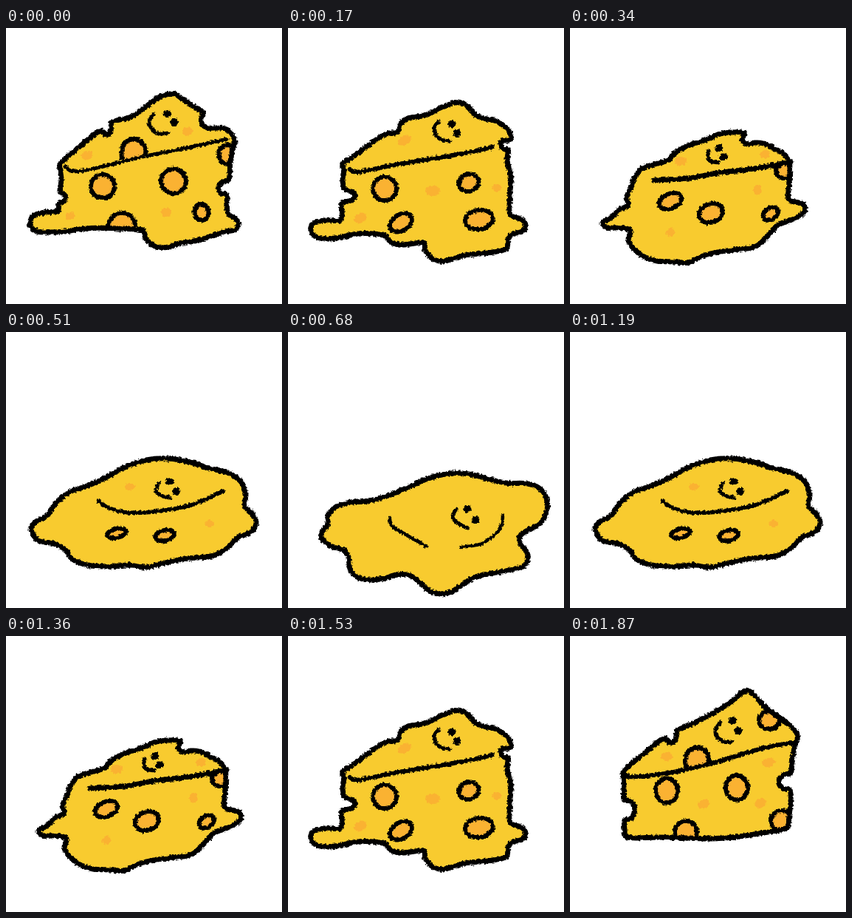
An HTML page that plays this animation: 374x373 px, repeating every 2040 ms.

```html
<!DOCTYPE html>
<html lang="en">
<head>
<meta charset="utf-8">
<title>Melting cheese</title>
<style>
  html, body { margin: 0; width: 100%; height: 100%; overflow: hidden; background: #fff; }
  svg { display: block; width: 100%; height: 100%; }
  .line { fill: none; stroke: #000; stroke-linecap: round; stroke-linejoin: round; }
  .hole { fill: #fab232; stroke: #000; stroke-width: 6; }
  .spot { fill: #fab232; }
</style>
</head>
<body>
<svg viewBox="0 0 374 373">
  <defs>
    <filter id="rough" filterUnits="userSpaceOnUse" x="0" y="0" width="374" height="373" color-interpolation-filters="sRGB">
      <feTurbulence type="fractalNoise" baseFrequency=".32" numOctaves="2" seed="4" result="n"/>
      <feDisplacementMap in="SourceGraphic" in2="n" scale="5" xChannelSelector="R" yChannelSelector="G"/>
    </filter>
    <clipPath id="inside"><path id="clip"/></clipPath>
  </defs>
  <g filter="url(#rough)">
    <path id="body" fill="#f8cb2f"/>
    <g id="marks" clip-path="url(#inside)"></g>
    <path id="rim" class="line" stroke-width="7"/>
    <g id="ink"></g>
  </g>
</svg>
<script>
const STEP = 170;

// rim, lines and smile are points on smooth curves.
// Holes and spots are [x, y, rx, ry, tilt]; eyes are [x, y].
const poses = [
  {
    rim: '72,184 78,177 101,158 125,139 131,141 137,145 143,140 145,128 151,125 177,113 203,99 222,86 232,77 239,74 247,77 256,87 267,98 285,111 299,122 307,131 308,138 304,152 301,170 299,185 290,187 284,193 283,199 288,206 298,208 299,225 297,243 295,258 285,262 262,266 230,271 190,274 160,273 120,272 90,273 76,271 74,262 74,249 82,247 87,239 87,229 81,223 73,221 73,205 72,190',
    lines: ['73,185 80,190 104,189 140,184 180,175 220,164 260,152 290,146 304,144'],
    lineWidth: 6,
    arch: '158,179 156,167 161,156 172,151 183,155 188,165 187,174',
    holes: [[270, 114, 14, 12], [131, 209, 15, 16.5], [226, 205, 15, 16.5, -8], [157, 265, 15, 15], [287, 250, 15, 14]],
    spots: [[131, 163, 8, 6], [269, 171, 9, 6, -15], [181, 227, 8, 6, -30], [258, 226, 8, 6, -25]],
    smile: '203,117 197,127 200,137 208,143 219,143',
    eyes: [[220, 114], [228, 128]]
  },
  {
    rim: '73,184 79,178 101,159 125,140 131,141 137,145 142,139 143,128 150,125 170,120 186,109 205,95 217,90 228,89 238,95 252,105 267,114 264,122 266,130 273,135 287,135 299,137 306,144 310,153 307,165 304,180 302,204 292,209 288,216 291,223 299,226 299,240 302,252 311,258 315,266 310,273 298,275 285,279 270,284 255,288 235,291 220,296 208,297 196,292 189,284 186,274 175,272 150,271 125,270 100,272 80,275 60,276 42,275 33,267 34,258 40,252 55,249 70,247 72,237 79,234 80,226 73,221 75,205 73,190',
    lines: ['80,187 88,193 104,193 140,185 180,175 220,167 260,159 300,150'],
    lineWidth: 5,
    arch: '157,178 157,164 163,154 174,150 184,155 189,164 189,171',
    holes: [[301, 171, 13, 13], [131, 214, 16, 16], [227, 207, 17, 16.5], [157, 267, 18, 17], [265, 249, 9.5, 11]],
    spots: [[110, 172, 8, 6, -15], [246, 140, 7, 6, -15], [217, 249, 7, 6], [87, 254, 6, 5, -20]],
    smile: '200,117 194,126 198,137 207,143 219,142',
    eyes: [[218, 116], [228, 127]]
  },
  {
    rim: '74,183 84,177 103,163 125,147 138,142 148,141 153,129 162,122 185,118 205,109 222,102 234,101 245,107 253,117 265,122 282,126 296,135 302,145 300,152 291,152 288,157 291,163 298,165 297,180 302,200 301,222 300,245 303,254 317,259 322,268 317,275 303,279 298,287 295,299 270,304 240,307 220,313 205,315 192,309 186,300 184,290 172,291 155,293 140,290 131,281 115,278 95,278 75,282 55,285 38,282 31,273 35,264 50,260 70,260 73,250 73,237 85,233 91,227 86,221 77,218 74,205 76,192',
    lines: ['84,191 92,195 110,192 150,184 200,176 240,169 277,161'],
    lineWidth: 6,
    holes: [[131, 217, 16, 16], [245, 209, 13.5, 11.5, -15], [259, 259, 19, 13, -8], [153, 263, 16, 11, -30]],
    spots: [[158, 152, 10, 6, -20], [196, 220, 10, 7], [283, 216, 6, 5], [98, 257, 9, 7, -25]],
    smile: '204,126 198,135 200,144 208,151 219,153',
    eyes: [[222, 130], [229, 142]]
  },
  {
    rim: '86,205 97,190 115,184 132,179 145,167 165,157 185,151 200,144 220,141 236,142 233,151 240,157 250,155 262,156 275,162 288,169 296,178 298,190 297,210 296,231 305,235 316,238 318,247 310,255 296,261 282,266 268,281 252,295 230,299 205,302 180,308 160,317 140,316 118,315 100,309 87,299 79,287 82,274 70,270 52,270 44,264 52,258 60,253 67,245 78,240 77,228 83,215',
    lines: ['114,206 160,203 200,196 250,190 299,181'],
    lineWidth: 7,
    holes: [[291, 193, 12, 10], [136, 234, 16, 10, -22], [191, 250, 16.5, 12.5, -20], [272, 251, 11, 8, -30]],
    spots: [[150, 180, 8, 6], [264, 171, 7, 6, -15], [254, 219, 6, 7], [136, 276, 6, 5.5]],
    smile: '188,166 187,174 191,180 201,182',
    eyes: [[202, 162], [208, 174]]
  },
  {
    rim: '34,267 41,256 56,248 66,233 85,217 110,208 135,197 160,183 190,173 220,171 250,176 275,184 300,190 318,202 325,219 323,235 334,246 339,258 332,270 314,278 300,292 278,303 245,306 215,312 190,318 165,315 140,317 110,315 90,307 80,294 64,286 44,282',
    lines: ['126,229 140,238 165,244 200,243 250,234 294,215'],
    lineWidth: 5.5,
    holes: [[150, 272, 13, 6, -12], [215, 275, 13, 7, -12]],
    spots: [[168, 209, 7, 5], [276, 259, 6, 5]],
    smile: '207,204 203,214 210,221 222,224',
    eyes: [[222, 202], [231, 215]]
  },
  {
    rim: '56,245 64,237 85,230 105,229 130,223 160,211 190,198 220,191 245,192 270,198 295,204 325,205 343,213 351,228 350,245 341,259 325,268 314,276 315,286 323,296 325,307 318,317 295,323 270,327 252,332 237,341 222,351 205,354 190,349 178,338 165,329 148,328 130,333 110,335 93,331 84,320 82,305 76,295 60,290 48,282 45,272 53,262 54,252',
    lines: ['138,251 141,262 160,274 188,290', '234,291 262,286 283,271 290,258 291,248'],
    lineWidth: 4.5,
    holes: [], spots: [],
    smile: '228,240 223,250 231,259 244,265',
    eyes: [[243, 239], [254, 254]]
  },
  {
    rim: '46,250 60,241 85,237 108,235 133,229 162,217 190,206 220,199 245,200 270,206 297,211 328,211 347,219 356,234 354,251 343,265 327,274 319,283 323,292 330,302 329,313 318,322 295,327 270,330 252,335 237,343 222,351 205,354 190,350 178,340 165,332 148,331 130,336 108,338 89,333 79,322 76,309 69,299 53,294 39,286 35,274 42,262',
    lines: ['138,259 142,269 160,280 186,293', '236,295 264,289 284,276 293,256'],
    lineWidth: 4.5,
    holes: [], spots: [],
    smile: '230,247 225,257 233,266 246,271',
    eyes: [[245, 246], [256, 260]]
  }
];

const order = [1, 2, 3, 4, 5, 6, 5, 4, 3, 2, 1, 0];
const $ = id => document.getElementById(id);

function curve(text, closed) {
  const pts = text.split(' ').map(p => p.split(',').map(Number));
  const n = pts.length;
  const at = i => pts[closed ? (i + n) % n : Math.max(0, Math.min(n - 1, i))];
  let d = 'M' + pts[0];
  for (let i = 0; i < (closed ? n : n - 1); i++) {
    const [a, b, c, e] = [at(i - 1), at(i), at(i + 1), at(i + 2)];
    const p = b.map((v, k) => v + (c[k] - a[k]) / 6);
    const q = c.map((v, k) => v - (e[k] - b[k]) / 6);
    d += `C${p} ${q} ${c}`;
  }
  return closed ? d + 'Z' : d;
}

const oval = (name, [x, y, rx, ry, tilt = 0]) =>
  `<ellipse class="${name}" cx="${x}" cy="${y}" rx="${rx}" ry="${ry}" transform="rotate(${tilt} ${x} ${y})"/>`;
const stroke = (text, width) =>
  `<path class="line" d="${curve(text)}" stroke-width="${width}"/>`;

function draw(pose) {
  const d = curve(pose.rim, true);
  for (const id of ['body', 'clip', 'rim']) $(id).setAttribute('d', d);
  $('marks').innerHTML =
    pose.spots.map(s => oval('spot', s)).join('') +
    pose.holes.map(h => oval('hole', h)).join('') +
    (pose.arch ? `<path class="hole" d="${curve(pose.arch)}"/>` : '');
  $('ink').innerHTML =
    pose.lines.map(l => stroke(l, pose.lineWidth)).join('') +
    stroke(pose.smile, 5) +
    pose.eyes.map(([x, y]) => oval('eye', [x, y, 5.5, 5, -20])).join('');
}

let shown = -1;
function tick() {
  const now = Math.floor(performance.now() / STEP) % order.length;
  if (now !== shown) draw(poses[order[shown = now]]);
  requestAnimationFrame(tick);
}
tick();
</script>
</body>
</html>
```
